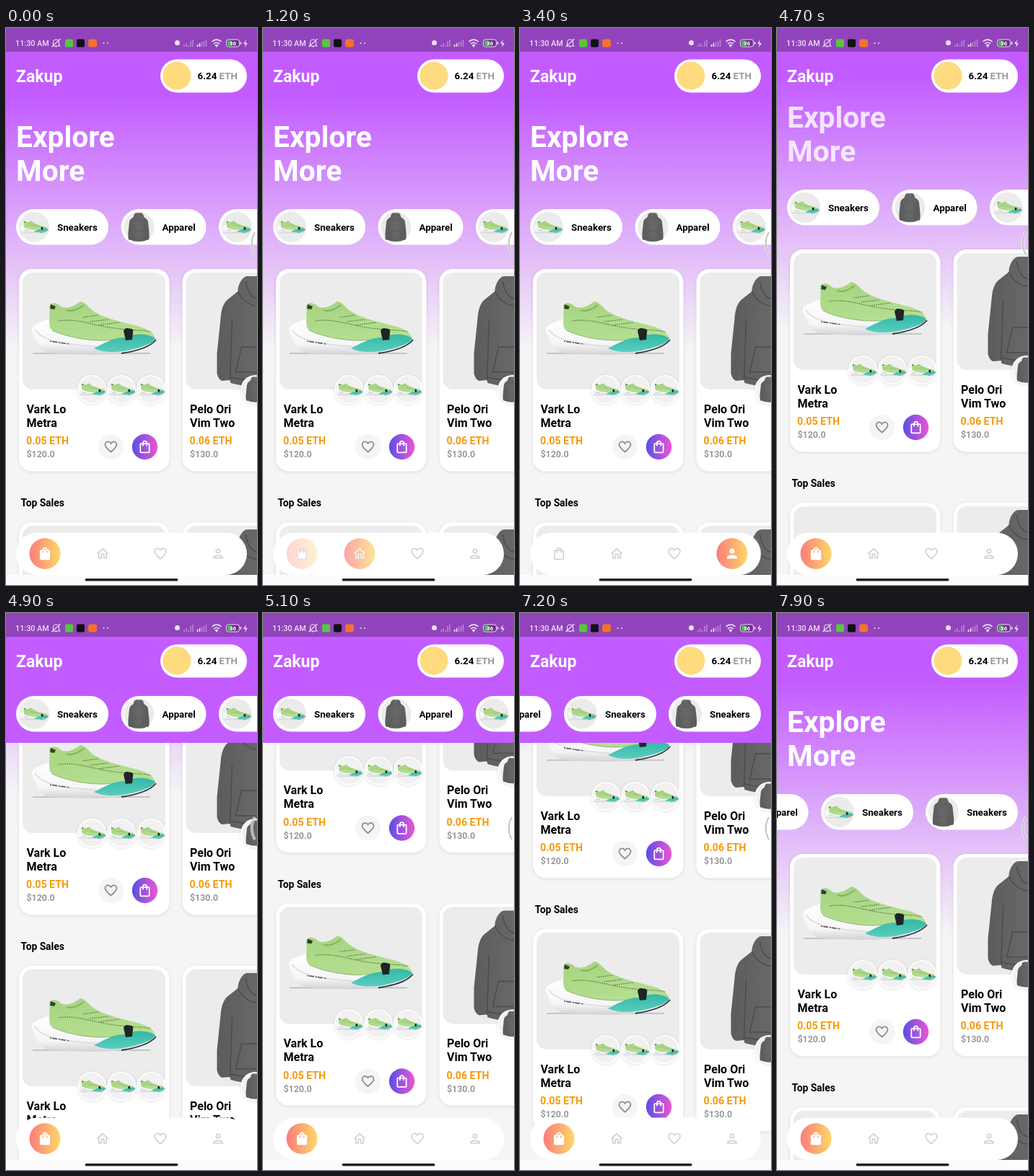
An HTML page for the animation above (8000 ms loop, 348x772 px).

```html
<!DOCTYPE html>
<html lang="en">
<head>
<meta charset="utf-8">
<title>Shop</title>
<style>
@property --scroll { syntax: "<number>"; inherits: true; initial-value: 0; }
@property --swipe { syntax: "<number>"; inherits: true; initial-value: 0; }
html, body { margin: 0; width: 100%; height: 100%; overflow: hidden; background: #f5f5f5; }
svg { display: block; }
#app {
  font-family: Roboto, sans-serif; font-weight: 700;
  animation: scroll 8s step-end -20ms infinite, swipe 8s step-end -20ms infinite;
}
.page { transform: translateY(calc(var(--scroll) * -1px)); }
.title { font-size: 40.7px; fill: #fff; opacity: calc(1 - var(--scroll) / 136); }
.sticky { transform: translateY(calc(min(var(--scroll), 136) * -1px)); }
.bar { fill: #c35cff; opacity: calc((var(--scroll) - 30) / 60); }
.chips { transform: translateX(calc(var(--swipe) * -1px)); }
.logo { font-size: 23px; fill: #fff; }
.name { font-size: 16px; }
.price { font-size: 14.2px; fill: #f59a0c; }
.cash { font-size: 12.4px; fill: #999; }
.label { font-size: 13.3px; }
.heading { font-size: 13.8px; }
.lift { filter: drop-shadow(0 1px 2px #0000001c); }
.line { fill: none; stroke: currentColor; stroke-width: 2; }
.idle { color: #d3d3d6; }
.active { color: #fff; }
.tab { opacity: 0; animation: 8s linear -20ms infinite; }
.t1 { animation-name: tab1; }
.t2 { animation-name: tab2; }
.t3 { animation-name: tab3; }
.t4 { animation-name: tab4; }

@keyframes scroll {
  0%, 57.5% { --scroll: 0; }
  58.75% { --scroll: 27; }
  60% { --scroll: 108; }
  61.25% { --scroll: 196; }
  62.5% { --scroll: 254; }
  63.75% { --scroll: 282.5; }
  66.25%, 88.75% { --scroll: 283.5; }
  90% { --scroll: 247; }
  91.25% { --scroll: 172; }
  92.5% { --scroll: 104; }
  93.75% { --scroll: 55; }
  95% { --scroll: 25; }
  96.25% { --scroll: 9; }
  97.5% { --scroll: 2; }
  98.75%, 100% { --scroll: 0; }
}
@keyframes swipe {
  0% { --swipe: 0; }
  75% { --swipe: 10; }
  76.25% { --swipe: 44; }
  77.5% { --swipe: 85.5; }
  78.75% { --swipe: 142; }
  80% { --swipe: 190; }
  81.25% { --swipe: 222; }
  82.5%, 100% { --swipe: 234; }
}
@keyframes tab1 { 0%, 13.1% { opacity: 1; } 16.25%, 49.4% { opacity: 0; } 51.25%, 100% { opacity: 1; } }
@keyframes tab2 { 0%, 13.1% { opacity: 0; } 16.25%, 24.4% { opacity: 1; } 28.75%, 100% { opacity: 0; } }
@keyframes tab3 { 0%, 24.4% { opacity: 0; } 28.75%, 39.4% { opacity: 1; } 42.5%, 100% { opacity: 0; } }
@keyframes tab4 { 0%, 39.4% { opacity: 0; } 42.5%, 49.4% { opacity: 1; } 51.25%, 100% { opacity: 0; } }
</style>
</head>
<body>
<svg id="app" width="348" height="772" viewBox="0 0 348 772">
  <defs>
    <linearGradient id="sky" gradientUnits="userSpaceOnUse" x1="0" y1="95" x2="0" y2="445">
      <stop stop-color="#c35cff"/><stop offset="1" stop-color="#f5f5f5"/>
    </linearGradient>
    <linearGradient id="warm"><stop stop-color="#fb7c7c"/><stop offset="1" stop-color="#fdd868"/></linearGradient>
    <linearGradient id="violet"><stop stop-color="#5b4ee6"/><stop offset="1" stop-color="#ea56d4"/></linearGradient>
    <linearGradient id="lime" x2=".3" y2="1"><stop stop-color="#a6d480"/><stop offset="1" stop-color="#b4de90"/></linearGradient>
    <linearGradient id="teal" x2="0" y2="1"><stop stop-color="#35b8a6"/><stop offset="1" stop-color="#58cdbe"/></linearGradient>
    <linearGradient id="sole" x2="0" y2="1"><stop stop-color="#fff"/><stop offset=".7" stop-color="#f6f6f8"/><stop offset="1" stop-color="#d2d2d6"/></linearGradient>
    <linearGradient id="cloth"><stop stop-color="#5c5c5c"/><stop offset=".5" stop-color="#686868"/><stop offset="1" stop-color="#5c5c5c"/></linearGradient>
    <clipPath id="round"><circle r="19.500"/></clipPath>
    <clipPath id="photo"><rect x="23" y="339" width="198" height="162" rx="14"/></clipPath>

    <!-- Pictures, centred on the origin -->
    <g id="shoe"><g transform="translate(-122 -417)">
      <path d="M37 451H200" stroke="#777" stroke-width="1.500" opacity=".45"/>
      <path d="M59 403C50 408 38 410 36 416C35 424 43 434 46 441C50 449 58 451 68 451C95 453 134 454 160 451C185 447 202 440 207 432L150 418Z" fill="url(#sole)"/>
      <path d="M40 418C50 434 80 438 128 442" fill="none" stroke="#dcdce0" stroke-width="1.500"/>
      <path d="M60 385C62 380 70 380 76 386C84 390 94 386 103 379C111 380 115 389 124 394C139 403 160 407 178 412C192 415 205 421 206 429C190 434 170 430 150 432C120 436 82 428 64 419C57 414 62 398 60 385Z" fill="url(#lime)"/>
      <path d="M64 419C82 428 120 436 150 432L206 429" fill="none" stroke="#86ab68" stroke-width="1.200" opacity=".7"/>
      <path d="M122 444C134 438 150 428 166 429C180 422 198 424 207 430C205 438 184 444 162 448C146 450 132 449 122 444Z" fill="url(#teal)"/>
      <path d="M160 451C180 448 200 442 208 432" fill="none" stroke="#30363c" stroke-width="1.800"/>
      <path d="M72 406C100 402 118 412 150 416S190 418 201 421M106 401L128 398M116 407L142 404M128 412L157 408" fill="none" stroke="#67884f" stroke-width="1.200" stroke-dasharray="2 1"/>
      <path d="M84 391C92 394 100 390 108 384" fill="none" stroke="#86b060" stroke-width="2"/>
      <path d="M62 383L69 386L67 390L61 389Z" fill="#33402f"/>
      <path d="M163 420Q164 416 168 416L174 417Q177 418 176 422L175 432L166 433Z" fill="#202426"/>
      <path d="M61 434L88 438" stroke="#555" stroke-width="1.600" stroke-dasharray="2 1 7 2"/>
    </g></g>
    <g id="hoodie"><g transform="translate(-56 -77)">
      <path d="M29 22C29 12 36 1 42 1H70C76 1 83 12 83 22L98 34C104 40 106 48 107 60L112 108V136Q110 144 105 146L94 145L93 149Q76 154 56 154T19 149L18 145L7 146Q2 144 0 136V108L5 60C6 48 8 40 14 34Z" fill="url(#cloth)"/>
      <path d="M29 22C34 34 46 42 56 42S78 34 83 22M40 8C42 24 50 32 56 32S70 24 72 8M21 62L18 145M91 62L94 145M19 141Q56 150 93 141M34 99H78L86 134H26Z" fill="none" stroke="#4c4c4c" stroke-width="1.500"/>
    </g></g>
    <g id="shoeDot" class="lift"><circle r="20" fill="#fff"/><circle r="18.500" fill="#f1f1f1"/><g clip-path="url(#round)"><use href="#shoe" transform="scale(.225)"/></g></g>
    <g id="hoodieDot" class="lift"><circle r="20" fill="#fff"/><circle r="18.500" fill="#f1f1f1"/><use href="#hoodie" transform="scale(.23)"/></g>

    <!-- Icons on a 24 unit grid, centred on the origin -->
    <g id="bag"><g transform="translate(-12 -12)" class="line">
      <rect x="5" y="7" width="14" height="14" rx="1"/><path d="M9 10V6a3 3 0 0 1 6 0v4" stroke-linecap="round"/>
    </g></g>
    <g id="bagFull"><g transform="translate(-12 -12)">
      <rect x="4" y="6" width="16" height="16" rx="2" fill="currentColor"/>
      <path class="line" d="M9 7V6a3 3 0 0 1 6 0v1"/>
      <path d="M9 8.500v1.500M15 8.500v1.500" stroke="#fca673" stroke-width="1.800" stroke-linecap="round"/>
    </g></g>
    <path id="home" transform="translate(-12 -12)" fill="currentColor" d="M12 5.700l5 4.500V18h-2v-6H9v6H7v-7.800zM12 3L2 12h3v8h6v-6h2v6h6v-8h3z"/>
    <path id="heart" transform="translate(-12 -12)" class="line" d="M12 20L10 18.200C6 14.600 3 12 3 8.500C3 6 5 4 7.500 4C9.300 4 11 5 12 6.700C13 5 14.700 4 16.500 4C19 4 21 6 21 8.500C21 12 18 14.600 14 18.200Z"/>
    <use id="heartFull" href="#heart" style="fill:currentColor"/>
    <g id="person"><g transform="translate(-12 -12)" class="line"><circle cx="12" cy="8" r="3"/><path d="M5 19v-1c0-2 4.700-3 7-3s7 1 7 3v1z"/></g></g>
    <circle id="disc" r="21.500" fill="url(#warm)"/>

    <g id="card">
      <rect class="lift" x="18" y="334" width="208.500" height="280.500" rx="18" fill="#fff"/>
      <rect x="23" y="339" width="198" height="162" rx="14" fill="#ececec"/>
    </g>
    <g id="shoeCard">
      <use href="#card"/>
      <use href="#shoe" x="122" y="417"/>
      <use href="#shoeDot" x="119" y="501"/><use href="#shoeDot" x="160" y="501"/><use href="#shoeDot" x="201" y="501"/>
      <text class="name" x="28.500" y="533.700">Vark Lo</text><text class="name" x="28.500" y="552.500">Metra</text>
      <text class="price" x="28" y="577">0.05 ETH</text><text class="cash" x="28.500" y="595">$120.0</text>
      <circle cx="145.500" cy="580.500" r="17.700" fill="#f5f5f5"/>
      <use href="#heart" transform="translate(145.500 580.500) scale(.886)" color="#8c8c8c"/>
      <circle cx="192.500" cy="580.500" r="17.700" fill="url(#violet)"/>
      <use href="#bag" transform="translate(192.500 580.500) scale(.886)" color="#fff"/>
    </g>
    <g id="hoodieCard" transform="translate(226.500)">
      <use href="#card"/>
      <g clip-path="url(#photo)"><use href="#hoodie" x="122" y="420"/></g>
      <use href="#hoodieDot" x="119" y="501"/>
      <text class="name" x="28.500" y="533.700">Pelo Ori</text><text class="name" x="28.500" y="552.500">Vim Two</text>
      <text class="price" x="28" y="577">0.06 ETH</text><text class="cash" x="28.500" y="595">$130.0</text>
    </g>
    <g id="row"><use href="#shoeCard"/><use href="#hoodieCard"/></g>

    <g id="pill"><rect width="128" height="49.500" rx="24.750" fill="#fff"/><circle cx="25" cy="24.750" r="21" fill="#ebebeb"/></g>
    <g id="shoeChip">
      <use href="#pill"/><use href="#shoe" transform="translate(25 25) scale(.23)"/>
      <text class="label" x="57" y="29.500">Sneakers</text>
    </g>
  </defs>

  <rect width="348" height="772" fill="#f5f5f5"/>

  <g class="page">
    <rect width="348" height="445" fill="url(#sky)"/>
    <g class="title"><text x="14" y="164.500">Explore</text><text x="14" y="212">More</text></g>
    <use href="#row"/>
    <text class="heading" x="20.500" y="663">Top Sales</text>
    <use href="#row" y="351"/>
  </g>

  <g class="sticky">
    <rect class="bar" y="235" width="348" height="81" />
    <g class="chips">
      <use href="#shoeChip" x="14" y="251"/>
      <g transform="translate(159.500 251)">
        <rect width="118" height="49.500" rx="24.750" fill="#fff"/><circle cx="25" cy="24.750" r="21" fill="#ebebeb"/>
        <use href="#hoodie" transform="translate(24.500 25) scale(.26)"/>
        <text class="label" x="57" y="29.500">Apparel</text>
      </g>
      <use href="#shoeChip" x="295" y="251"/>
      <g transform="translate(440 251)">
        <use href="#pill"/><use href="#hoodie" transform="translate(24.500 25) scale(.26)"/>
        <text class="label" x="57" y="29.500">Sneakers</text>
      </g>
    </g>
  </g>

  <rect class="bar" y="33" width="348" height="67"/>
  <text class="logo" x="14" y="74.500">Zakup</text>
  <rect x="214" y="43.500" width="120" height="46" rx="23" fill="#fff"/>
  <circle cx="237" cy="66.300" r="19.500" fill="#fddb7e"/>
  <text class="label" x="265.500" y="71">6.24 <tspan fill="#999">ETH</tspan></text>

  <!-- Status bar -->
  <rect width="348" height="33" fill="#9143bb"/>
  <g fill="#ecdff3" color="#ecdff3">
    <text x="13" y="25" font-size="10.800" font-weight="500">11:30 AM</text>
    <path d="M65.500 24V20a4 4 0 0 1 8 0v4l1 1H64.500zM68.500 26h2M63.500 26l12-11" fill="none" stroke="currentColor" stroke-width="1.200"/>
    <rect x="82" y="15.500" width="11" height="11" rx="2" fill="#55c93c"/>
    <rect x="98" y="15.500" width="11" height="11" rx="2" fill="#111"/>
    <rect x="114" y="15.500" width="12" height="11" rx="3" fill="#f3722c"/>
    <circle cx="135.500" cy="21" r="1"/><circle cx="141" cy="21" r="1"/>
    <circle cx="237.500" cy="20.500" r="3.500"/>
    <path d="M247 26v-3m3 3v-5m3 3v2m3-8v8m3-10v10M265.500 26v-3m3 3v-5m3 5v-7m3 7v-8m3 8v-10" stroke="currentColor" stroke-width="1.500" opacity=".45"/>
    <path d="M265.500 26v-3m3 3v-5" stroke="currentColor" stroke-width="1.500"/>
    <path d="M285.500 19a9 9 0 0 1 13 0M288 22a5.500 5.500 0 0 1 8 0" fill="none" stroke="currentColor" stroke-width="1.700"/>
    <path d="M289.500 23.500a4 4 0 0 1 5 0L292 27z"/>
    <rect x="305.500" y="16" width="18" height="10" rx="3" fill="#6d318d" stroke="currentColor"/>
    <rect x="307" y="17.500" width="6" height="7" rx="1" fill="#43c04c"/>
    <path d="M325.500 19v4" stroke="currentColor" stroke-width="1.500"/>
    <text x="314.500" y="24" font-size="8" text-anchor="middle" fill="#fff">36</text>
    <path d="M333 16l-4 6h3l-1 5 4-6h-3z"/>
  </g>

  <path d="M345 283Q336.500 298 345 314" fill="none" stroke="#fff" stroke-width="4" opacity=".6"/>
  <path d="M345 283Q336.500 298 345 314" fill="none" stroke="#b5b5b5" stroke-width="2" opacity=".8"/>

  <!-- Tab bar -->
  <rect y="758" width="348" height="14" fill="#fcfcfc"/>
  <rect x="14" y="699.500" width="320" height="58.500" rx="29.250" fill="#fff"/>
  <g class="idle">
    <use href="#bag" transform="translate(54 728.500) scale(.886)"/>
    <use href="#home" transform="translate(134 728.500) scale(.886)"/>
    <use href="#heart" transform="translate(214 728.500) scale(.886)"/>
    <use href="#person" transform="translate(294 728.500) scale(.886)"/>
  </g>
  <g class="active">
    <g class="tab t1"><use href="#disc" x="54" y="728.500"/><use href="#bagFull" transform="translate(54 728.500) scale(.886)"/></g>
    <g class="tab t2"><use href="#disc" x="134" y="728.500"/><use href="#home" transform="translate(134 728.500) scale(.886)"/></g>
    <g class="tab t3"><use href="#disc" x="214" y="728.500"/><g transform="translate(214 728.500) scale(.886)"><use href="#heart"/><path d="M-8 -3.500Q-7 -7 -4 -7L0 -4L4 -7Q7 -7 8 -3.500Q8 1 0 7Q-8 1 -8 -3.500Z" fill="#fff"/></g></g>
    <g class="tab t4"><use href="#disc" x="294" y="728.500"/><g transform="translate(294 728.500) scale(.886)"><use href="#person"/><circle cy="-4" r="3" fill="#fff"/><path d="M-7 7V6Q-5 3 0 3T7 6V7Z" fill="#fff"/></g></g>
  </g>
  <rect x="109.500" y="763" width="129" height="3.500" rx="1.750" fill="#222"/>
</svg>
</body>
</html>
```
